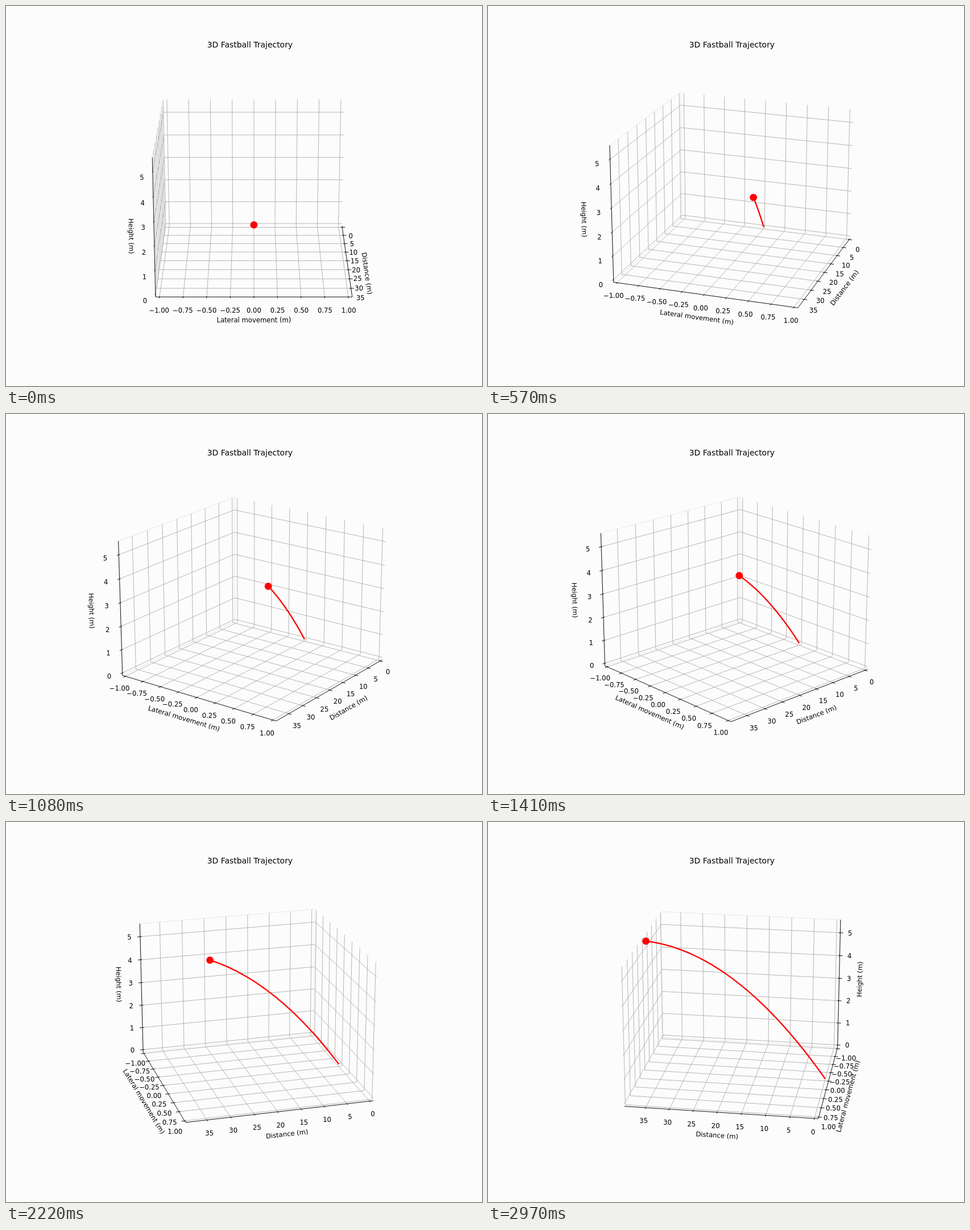
Recreate the animation shown at these times as an HTML page with a canvas. Size 837 by 669 pixels, loop 3 s.

```html
<!DOCTYPE html>
<html lang="en">
<head>
<meta charset="utf-8">
<title>3D Fastball Trajectory</title>
<style>
html, body { margin: 0; width: 100%; height: 100%; overflow: hidden; background: #fcfcfc; }
canvas { display: block; }
</style>
</head>
<body>
<canvas id="stage" width="837" height="669"></canvas>
<script>
const ctx = document.getElementById('stage').getContext('2d');
const FRAMES = 100, STEP = 30;
const PT = 1.1625;                      // pixels per point
const SCALE = 2787, CX = 435.9, CY = 331.2;
const SIZE = [8 / 7, 8 / 7, 6 / 7];     // box edge lengths
const EDGE = 25 / 48;                   // half box, including its margin
const TICK_PAD = 0.05185, LABEL_PAD = 0.1127;
const ELEV = 20 * Math.PI / 180, SE = Math.sin(ELEV), CE = Math.cos(ELEV);

// Launch at 40 m/s and 15 degrees, followed for one second
const VX = 40 * Math.cos(Math.PI / 12), VZ = 40 * Math.sin(Math.PI / 12);
const G = 9.81, TOP = VZ - G / 2;

const range = (n, f) => Array.from({ length: n }, (_, i) => f(i));
const AXES = [
  { label: 'Distance (m)', tickDir: 1,
    ticks: range(8, i => [i * 5 / VX - 0.5, String(i * 5)]) },
  { label: 'Lateral movement (m)', tickDir: 0,
    ticks: range(9, i => [i / 8 - 0.5, (i / 4 - 1).toFixed(2).replace('-', '\u2212')]) },
  { label: 'Height (m)', tickDir: 0,
    ticks: range(6, i => [i / TOP - 0.5, String(i)]) }
];

let sinA, cosA;

// Perspective view of a point given in box units, each from -0.5 to 0.5
function project(p) {
  const [x, y, z] = p.map((v, k) => v * SIZE[k]);
  const toward = x * cosA + y * sinA;
  const depth = 10 - toward * CE - z * SE;
  return [CX + SCALE * (y * cosA - x * sinA) / depth,
          CY - SCALE * (z * CE - toward * SE) / depth];
}

function line(points, color, width) {
  ctx.beginPath();
  points.forEach(p => ctx.lineTo(...project(p)));
  ctx.strokeStyle = color;
  ctx.lineWidth = width;
  ctx.stroke();
}

function text(str, x, y, size = 10, angle = 0, drop = 0) {
  ctx.save();
  ctx.translate(x, y);
  ctx.rotate(angle);
  ctx.font = `${size * PT}px "DejaVu Sans", sans-serif`;
  ctx.textAlign = 'center';
  ctx.fillStyle = '#000';
  ctx.fillText(str, 0, drop);
  ctx.restore();
}

const put = (p, k, v) => p.map((c, j) => j === k ? v : c);
const outward = (p, k, d) => p.map((c, j) => j === k ? c : c + Math.sign(c) * d);

function drawAxis(axis, k, corner, edge) {
  const [a, b] = [0, 1, 2].filter(j => j !== k);
  for (const [v] of axis.ticks) {
    const c = put(corner, k, v);
    line([put(c, a, -c[a]), c, put(c, b, -c[b])], '#b0b0b0', 0.8 * PT);
  }

  const ends = [put(edge, k, -EDGE), put(edge, k, EDGE)];
  line(ends, '#000', 0.8 * PT);

  const [p, q] = ends.map(project);
  let angle = Math.atan2(q[1] - p[1], q[0] - p[0]);
  if (angle >= Math.PI / 2) angle -= Math.PI;
  if (angle < -Math.PI / 2) angle += Math.PI;
  const mid = project(outward(put(edge, k, 0), k, LABEL_PAD));
  text(axis.label, ...mid, 10, angle, 3.2);

  const d = axis.tickDir, side = Math.sign(edge[d]);
  for (const [v, str] of axis.ticks) {
    const t = put(edge, k, v);
    line([put(t, d, t[d] - side / 120), put(t, d, t[d] + side / 60)], '#000', 0.8 * PT);
    text(str, ...project(outward(t, k, TICK_PAD)), 10, 0, 8.8);
  }
}

function ballAt(i) {
  const t = i / (FRAMES - 1);
  return [t - 0.5, 0, (VZ * t - G * t * t / 2) / TOP - 0.5];
}

function draw(i) {
  const azim = i * Math.PI / 180;
  sinA = Math.sin(azim);
  cosA = Math.cos(azim);
  ctx.fillStyle = '#fcfcfc';
  ctx.fillRect(0, 0, 837, 669);
  ctx.lineCap = 'butt';
  text('3D Fastball Trajectory', 428.9, 73.4, 12);

  const near = i > 90 ? -EDGE : EDGE;   // open side of the distance axis
  const corner = [-near, -EDGE, -EDGE];
  line([[-1, -1], [1, -1], [1, 1], [-1, 1], [-1, -1]]
    .map(([x, z]) => [x * EDGE, -EDGE, z * EDGE]), '#ececec', PT);
  AXES.forEach((axis, k) =>
    drawAxis(axis, k, corner, [near, k === 2 ? -EDGE : EDGE, -EDGE]));

  ctx.lineCap = 'square';
  ctx.lineJoin = 'round';
  if (i) line(range(i + 1, ballAt), '#f00', 2 * PT);
  ctx.beginPath();
  ctx.arc(...project(ballAt(i)), 5.5 * PT, 0, Math.PI * 2);
  ctx.fillStyle = '#f00';
  ctx.fill();
}

const start = performance.now();
function tick() {
  draw(Math.floor(Math.max(0, performance.now() - start) / STEP) % FRAMES);
  requestAnimationFrame(tick);
}
tick();
</script>
</body>
</html>
```
